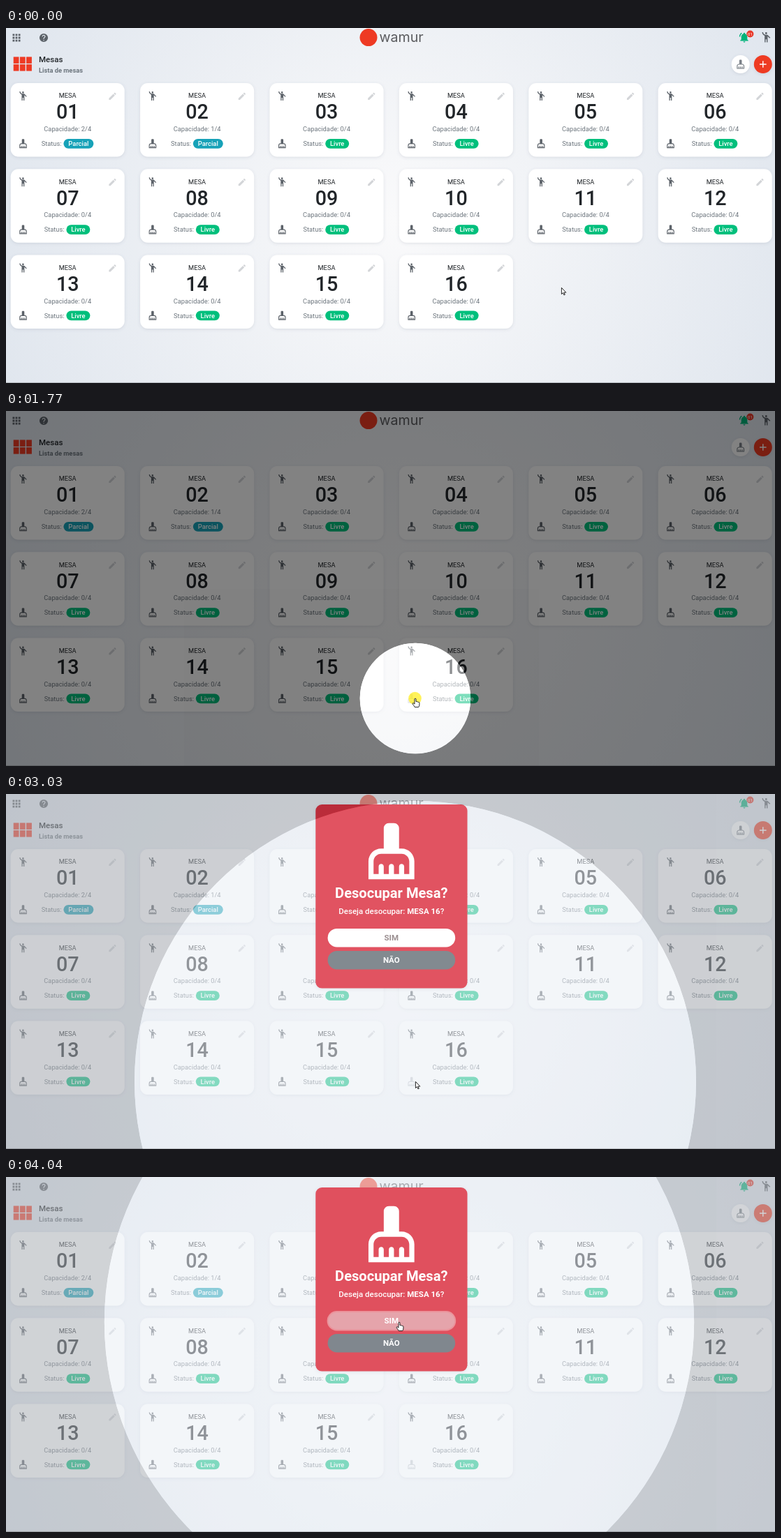
Animation of 1101x509 px, one loop 4100 ms. Source, as an HTML page:

```html
<!DOCTYPE html>
<html lang="pt">
<head>
<meta charset="utf-8">
<title>Mesas</title>
<style>
html, body { margin: 0; width: 100%; height: 100%; overflow: hidden; }
svg { display: block; width: 1101px; height: 509px; font-family: Roboto, sans-serif; }
.mid { text-anchor: middle; }
.med { font-weight: 500; }
.bold { font-weight: 700; }
</style>
</head>
<body>
<svg id="stage" viewBox="0 0 1101 509">
  <defs>
    <radialGradient id="bg" gradientUnits="userSpaceOnUse" cx="556" cy="275" r="610">
      <stop offset="0" stop-color="#fafafb"/>
      <stop offset="1" stop-color="#e0e6ee"/>
    </radialGradient>
    <filter id="soft" x="-10%" y="-10%" width="120%" height="125%">
      <feDropShadow dx="0" dy="1.2" stdDeviation="2" flood-color="#56657a" flood-opacity=".16"/>
    </filter>
    <path id="person" d="M10 4a2 2 0 1 0 4 0a2 2 0 1 0-4 0zM15.89 8.11C15.5 7.72 14.83 7 13.53 7H10.99C8.24 6.99 6 4.75 6 2H4c0 3.16 2.11 5.84 5 6.71V22h2v-6h2v6h2V10.05L18.95 14l1.41-1.41z"/>
    <path id="pencil" d="M3 17.25V21h3.75L17.81 9.94l-3.75-3.75zM20.71 7.04c.39-.39.39-1.02 0-1.41l-2.34-2.34c-.39-.39-1.02-.39-1.41 0l-1.83 1.83 3.75 3.75z"/>
    <path id="broom" d="M16 11h-1V3c0-1.1-.9-2-2-2h-2c-1.1 0-2 .9-2 2v8H8c-2.76 0-5 2.24-5 5v7h18v-7c0-2.76-2.24-5-5-5zm3 10h-2v-3c0-.55-.45-1-1-1s-1 .45-1 1v3h-2v-3c0-.55-.45-1-1-1s-1 .45-1 1v3H9v-3c0-.55-.45-1-1-1s-1 .45-1 1v3H5v-5c0-1.65 1.35-3 3-3h8c1.65 0 3 1.35 3 3z"/>
    <path id="apps" d="M4 4h4v4H4zM10 4h4v4h-4zM16 4h4v4h-4zM4 10h4v4H4zM10 10h4v4h-4zM16 10h4v4h-4zM4 16h4v4H4zM10 16h4v4h-4zM16 16h4v4h-4z"/>
    <path id="help" d="M12 2a10 10 0 1 0 0 20a10 10 0 1 0 0-20zm1 17h-2v-2h2zm2.07-7.75l-.9.92C13.45 12.9 13 13.5 13 15h-2v-.5c0-1.1.45-2.1 1.17-2.83l1.24-1.26c.37-.36.59-.86.59-1.41 0-1.1-.9-2-2-2s-2 .9-2 2H8c0-2.21 1.79-4 4-4s4 1.79 4 4c0 .88-.36 1.68-.93 2.25z"/>
    <path id="bell" d="M7.58 4.08L6.15 2.65C3.75 4.48 2.17 7.3 2.03 10.5h2c.15-2.65 1.51-4.97 3.55-6.42zm12.39 6.42h2c-.15-3.2-1.73-6.02-4.12-7.85l-1.42 1.43c2.02 1.45 3.39 3.77 3.54 6.42zM18 11c0-3.07-1.64-5.64-4.5-6.32V4a1.5 1.5 0 0 0-3 0v.68C7.63 5.36 6 7.92 6 11v5l-2 2v1h16v-1l-2-2zM12 22a2 2 0 0 0 2-2h-4a2 2 0 0 0 2 2z"/>
  </defs>
  <rect width="1101" height="509" fill="url(#bg)"/>
  <g id="page"></g>
  <rect id="veil" width="1101" height="509" fill="#e4ebf3" opacity="0"/>
  <g id="modal" opacity="0">
    <rect x="443.3" y="15" width="217.2" height="263.6" rx="9" fill="#dc3545" filter="url(#soft)"/>
    <use href="#broom" fill="#fff" transform="translate(551.8 82) scale(3.65) translate(-12 -12)"/>
    <g fill="#fff" class="mid">
      <text x="551.8" y="149" font-size="20.1" class="bold">Desocupar Mesa?</text>
      <text x="551.8" y="171.6" font-size="11.5" class="med">Deseja desocupar: <tspan class="bold">MESA 16</tspan>?</text>
    </g>
    <rect id="yes" x="460.6" y="193" width="182.6" height="26.4" rx="13.2" fill="#fff"/>
    <rect x="460.6" y="225" width="182.6" height="26.4" rx="13.2" fill="#6c757d"/>
    <g font-size="11.5" class="mid bold">
      <text id="yesText" x="551.8" y="210.4">SIM</text>
      <text x="551.8" y="242.4" fill="#fff">NÃO</text>
    </g>
  </g>
  <path d="M0 508.5H1101" stroke="#b4b9bf"/>
  <g id="light">
    <path id="dark" fill-rule="evenodd"/>
    <circle id="spot" fill="#fff"/>
  </g>
  <circle id="press" r="9.3" fill="#ffeb00" opacity=".65"/>
  <g id="cursor" stroke-width=".9" stroke-linejoin="round" fill="#fff">
    <path id="arrow" d="M.4.4V9.6L2.5 7.7 3.9 10.9 5.3 10.3 3.9 7.2H6.8Z"/>
    <path id="hand" stroke="#111" d="M-1 1.2Q-1 .2 0 .2T1 1.2V4.6Q2.2 4 2.7 5Q4 4.5 4.4 5.5Q5.9 5.2 5.9 6.6V9Q5.9 11 4.7 12.6H-.8Q-1.4 11-3.8 8.2Q-4.3 7.2-3.2 6.8Q-2.2 6.7-1 8.2Z"/>
  </g>
</svg>
<script>
const $ = id => document.getElementById(id);
const set = (id, attrs) => { for (const k in attrs) $(id).setAttribute(k, attrs[k]); };

// ---- static page ----
const icon = (name, x, y, s, fill, extra = '') =>
  `<use href="#${name}" fill="${fill}" ${extra} transform="translate(${x} ${y}) scale(${s}) translate(-12 -12)"/>`;
const text = (str, x, y, size, fill, cls = '') =>
  `<text x="${x}" y="${y}" font-size="${size}" fill="${fill}" class="${cls}">${str}</text>`;
const disc = (x, y, r, fill, extra = '') => `<circle cx="${x}" cy="${y}" r="${r}" fill="${fill}" ${extra}/>`;

const RED = '#ee3a24', GREY = '#6c757d', INK = '#212529', SLATE = '#5c6269';

function card(i) {
  const used = [2, 1][i] || 0;
  const [label, w, x0, color] = used ? ['Parcial', 43, 44, '#17a2b8'] : ['Livre', 34, 48, '#00bf7c'];
  const num = String(i + 1).padStart(2, '0');
  return `<g transform="translate(${6.7 + i % 6 * 185.4} ${79 + Math.floor(i / 6) * 123.25})">
    <rect width="163" height="105.5" rx="11" fill="#fff" filter="url(#soft)"/>`
    + icon('person', 17.7, 18.5, .64, SLATE)
    + icon('pencil', 145.8, 18.8, .57, '#d3d5d8')
    + icon('broom', 17.8, 86.8, .59, SLATE, `id="broom${num}"`)
    + text('MESA', 81.5, 21.3, 9.3, INK, 'mid')
    + text(num, 81.5, 51.4, 28.7, INK, 'mid med')
    + text(`Capacidade: ${used}/4`, 81.5, 69, 9.3, GREY, 'mid')
    + text('Status:', x0, 90, 9.3, GREY)
    + `<rect x="${x0 + 31.7}" y="79.9" width="${w}" height="13.8" rx="6.9" fill="${color}"/>`
    + text(label, x0 + 31.7 + w / 2, 90, 9.4, '#fff', 'mid med') + '</g>';
}

let html = icon('apps', 15, 14, .69, SLATE) + icon('help', 54, 14, .61, SLATE)
  + disc(519, 13.6, 12.5, RED)
  + `<text x="534.5" y="20.4" font-size="19.6" fill="#5b5c5f" style="font-family:Inter,sans-serif">wamur</text>`
  + icon('bell', 1057, 13.5, .72, '#00b37a') + disc(1065.4, 8.5, 5, '#e8392a')
  + text('01', 1065.4, 10.7, 6, '#fff', 'mid') + icon('person', 1088.3, 13.3, .72, SLATE);
for (let i = 0; i < 6; i++)
  html += `<rect x="${10.7 + i % 3 * 9.2}" y="${41.4 + (i > 2) * 10.7}" width="7.8" height="9.5" fill="${RED}"/>`;
html += text('Mesas', 47, 49.3, 11.5, INK, 'med') + text('Lista de mesas', 47, 63.8, 9.3, GREY, 'bold')
  + disc(1051.7, 52, 13, '#fff', 'filter="url(#soft)"') + icon('broom', 1051.7, 52, .6, '#7b8188')
  + disc(1083.8, 52, 13, RED, 'filter="url(#soft)"')
  + '<path d="M1079 52h9.6M1083.8 47.2v9.6" stroke="#fff" stroke-width="1.4"/>';
for (let i = 0; i < 16; i++) html += card(i);
$('page').innerHTML = html;

// ---- motion ----
const LOOP = 4100;
const BURSTS = [[730, 1230], [1300, 1770], [1850, 2320], [3030, 3520], [3590, 4040]];
const A = [795, 372], B = [586, 412], C = [563, 208];
const clamp = v => Math.max(0, Math.min(1, v));
const smooth = v => v * v * (3 - 2 * v);

function bezier(x1, y1, x2, y2) {
  const f = (u, a, b) => 3 * u * (1 - u) ** 2 * a + 3 * u * u * (1 - u) * b + u ** 3;
  return x => {
    let lo = 0, hi = 1;
    for (let i = 0; i < 24; i++) {
      const m = (lo + hi) / 2;
      if (f(m, x1, x2) < x) lo = m; else hi = m;
    }
    return f(lo, y1, y2);
  };
}
const glide = bezier(.41, .52, 0, .94);
const easeOut = bezier(0, 0, .58, 1);

function stepTime(t) {
  let q = 0;
  for (const [a, b] of BURSTS) {
    if (t < a - .01) break;
    const d = (b - a) / 7;
    q = a + Math.min(7, Math.floor((t - a) / d + .01)) * d;
  }
  return q;
}

function pointer(t) {
  const [p, q, s] = t < 2500 ? [A, B, (t - 1090) / 500] : [B, C, (t - 3198) / 500];
  const k = smooth(clamp(s));
  return [p[0] + (q[0] - p[0]) * k, p[1] + (q[1] - p[1]) * k];
}

// 0 = hidden and wide, 1 = dark with a tight spot
function focus(t) {
  const [on, off] = t < 2500 ? [650, 1766] : [2950, 3940];
  if (t < on) return 0;
  return t < off ? glide(clamp((t - on) / 390)) : 1 - glide(clamp((t - off) / 390));
}

function draw(time) {
  const t = stepTime(time);
  const [x, y] = pointer(t);

  const open = t - 1900;
  const fade = clamp(open / 150);
  set('veil', { opacity: .48 * fade });
  set('modal', { opacity: fade, transform: `translate(0 ${-36 * (1 - easeOut(clamp(open / 300)))})` });

  const onYes = t > 3000 && y < 219;
  set('yes', onYes ? { fill: '#e2969e', stroke: '#e8828c', 'stroke-width': 2 } : { fill: '#fff', stroke: 'none' });
  set('yesText', { fill: onYes ? '#fff' : '#8a7c7e' });

  const onBroom = t > 1520;
  set('broom16', { fill: onBroom ? '#c6cace' : SLATE });

  const k = focus(t), r = 71.7 * (9 - 8 * k);
  const [sx, sy] = pointer(t - 65);
  set('light', { opacity: k ? .5 * k ** 1.4 : 0 });
  set('spot', { cx: sx, cy: sy, r });
  set('dark', { d: `M0 0H1101V509H0ZM${sx - r} ${sy}a${r} ${r} 0 1 0 ${2 * r} 0a${r} ${r} 0 1 0 ${-2 * r} 0Z` });

  const pressed = (t > 1690 && t < 1840) || (t > 3905 && t < 3980);
  set('press', { cx: x - .5, cy: y, visibility: pressed ? 'visible' : 'hidden' });

  const hand = (onBroom && open < 0) || onYes;
  set('cursor', { transform: `translate(${x} ${y})` });
  set('arrow', { visibility: hand ? 'hidden' : 'visible', stroke: open >= 0 && t < 3000 ? '#c92a36' : '#111' });
  set('hand', { visibility: hand ? 'visible' : 'hidden' });
}

const start = performance.now();
function tick() {
  draw((performance.now() - start) % LOOP);
  requestAnimationFrame(tick);
}
tick();
</script>
</body>
</html>
```
